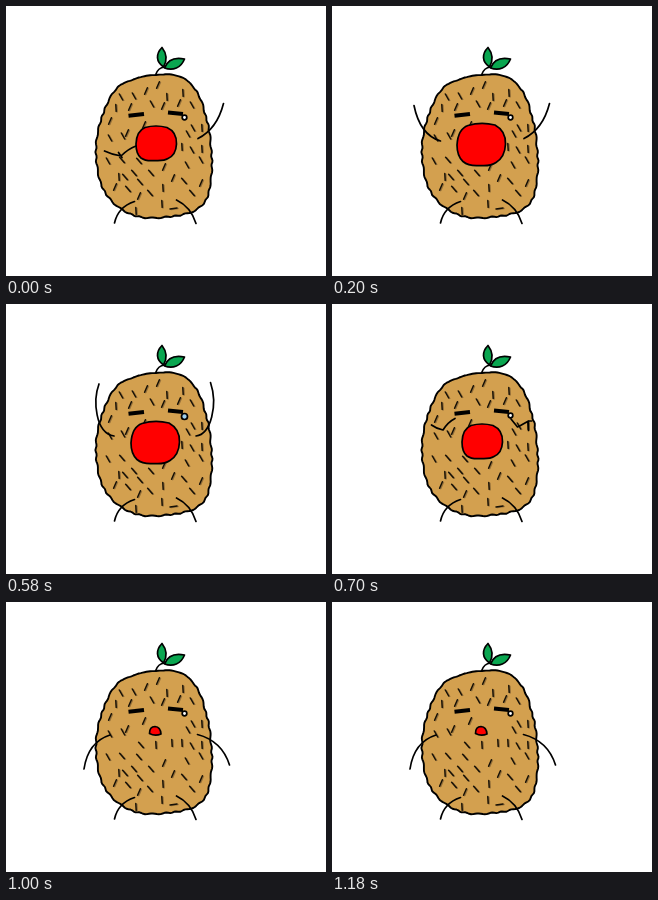
These frames come from a looping animation (320x270 px, 1300 ms). An HTML page:

```html
<!DOCTYPE html>
<html lang="en">
<head>
<meta charset="utf-8">
<title>Yawning potato</title>
<style>
html, body { margin: 0; width: 100%; height: 100%; overflow: hidden; background: #fff; }
svg { display: block; width: 100vw; height: 100vh; }
.line { fill: none; stroke: #000; stroke-width: 1.7; stroke-linecap: round; stroke-linejoin: round; }
</style>
</head>
<body>
<svg viewBox="0 0 320 270">
  <path id="body" fill="#d3a04f" stroke="#000" stroke-width="1.9" stroke-linejoin="round"/>
  <g fill="none" stroke-linecap="round">
    <path id="shade" stroke="#95703a" stroke-width="1.4" transform="translate(1.1 .5)"/>
    <path id="seeds" stroke="#161006" stroke-width="1.5"/>
  </g>
  <g class="line">
    <path d="M149.500 69Q152 61.500 158.500 61"/>
    <path fill="#0aa650" d="M157.500 61C150 56 149.500 48 156 41.500C161 48 161 55 157.500 61Z"/>
    <path fill="#0aa650" d="M158.500 62C162 53 169 51 178.500 53C175 62 167 65 158.500 62Z"/>
    <path d="M128.500 195.500Q112 201 108.500 217"/>
    <path d="M170.500 194Q185 201 190 217.500"/>
  </g>
  <path d="M122.500 109.800L138 108M162 106.500L177 108" stroke="#000" stroke-width="4" fill="none"/>
  <path id="mouth" class="line" style="fill:#f00"/>
  <circle id="tear" class="line" cx="178.500"/>
  <path id="arms" class="line"/>
</svg>
<script>
const $ = id => document.getElementById(id);

// Smooth closed curve through a few points.
function closedCurve(points) {
  const n = points.length, at = i => points[(i + n) % n];
  let d = `M${points[0]}`;
  for (let i = 0; i < n; i++) {
    const [a, b, c, e] = [at(i - 1), at(i), at(i + 1), at(i + 2)];
    const p = b.map((v, k) => v + (c[k] - a[k]) / 6);
    const q = c.map((v, k) => v - (e[k] - b[k]) / 6);
    d += `C${p} ${q} ${c}`;
  }
  return d + 'Z';
}

const outline = closedCurve([
  [150, 69], [165, 68.5], [179, 73], [188, 82], [195, 94], [199, 108], [203, 123],
  [205, 142], [206, 160], [204, 180], [200, 194], [190, 204], [175, 209], [160, 211],
  [145, 212], [130, 210], [115, 203], [103, 192], [95, 178], [91, 160], [90, 142],
  [92, 125], [97, 108], [104, 92], [113, 80], [126, 74], [139, 70]
]);

// Roughen the lower part of the skin.
function roughen(path, d) {
  path.setAttribute('d', d);
  const length = path.getTotalLength(), steps = 220;
  let rough = '';
  for (let i = 0; i < steps; i++) {
    const { x, y } = path.getPointAtLength(length * i / steps);
    const dx = x - 148, dy = y - 141;
    const amount = y > 82 ? 0.55 : 0.1;
    const k = 1 + amount * Math.sin(i * 1.05 + Math.sin(i * 0.31)) / Math.hypot(dx, dy);
    rough += `${i ? 'L' : 'M'}${(148 + dx * k).toFixed(1)} ${(141 + dy * k).toFixed(1)}`;
  }
  path.setAttribute('d', rough + 'Z');
}
roughen($('body'), outline);

// Seed centres grouped by the lean of the stroke.
const seedGroups = [
  [1.7, 3, '115,91 128,90 146,98 186,99 117,130 104,132 102,155 187,122 182,128 186,144 181,159 195,154'],
  [2.4, 2.7, '116,154 133,155 128,167 134,176 144,187 119,171 145,167 178,175 186,187 135,143 122,183'],
  [-1.4, 3.2, '140,85 152,79 124,101 157,100 173,97 104,115 121,127 138,119 109,181 133,190 167,172 195,177 158,161'],
  [0.2, 3.4, '161,91 177,87 110,102 196,122 176,141 196,143 157,182 113,171 156,198 130,205 166,141 150,143']
];
const seeds = seedGroups.map(([dx, dy, spots]) =>
  spots.split(' ').map(spot => {
    const [x, y] = spot.split(',').map(Number);
    return `M${x - dx} ${y - dy}l${2 * dx} ${2 * dy}`;
  }).join('')).join('') + 'M164 203l7 -1';
$('seeds').setAttribute('d', seeds);
$('shade').setAttribute('d', seeds);

const mouths = {
  mid: 'M139 121.500Q150 118.500 161 121.500Q171 126 170.500 138Q170 149 162 152.500Q158 155 149 154.500Q140 155.500 135 152Q130 148 130 138Q130.500 125 139 121.500Z',
  wide: 'M136 119.500Q149 115.500 163 119Q174 125 173.500 138Q173 151 164 156.500Q158 160.500 148 159.500Q137 160.500 131 155.500Q125 150 125 139Q126 123 136 119.500Z',
  small: 'M143.500 131.500Q143.500 124.500 149 124.500Q154.500 125 155 132Q149 134.500 143.500 131.500Z'
};
const raisedRight = 'M192 132.500Q211 123 217.500 97.500';
const poses = [
  { until: 200, mouth: 'mid', arms: 'M98.500 145Q107 149 115 150Q122 143 130 140M112.500 146.500L116 151.500' + raisedRight },
  { until: 400, mouth: 'wide', arms: 'M82 99.500Q88 129 108.500 135' + raisedRight },
  { until: 700, mouth: 'wide', wet: true, arms: 'M93 80C87 96 89 129 108 132M204.500 78.500C212 101 205 130 190 132' },
  { until: 1000, mouth: 'mid', arms: 'M99.500 121Q105 125 111 126Q116 118 123 114.500M179 115L185.500 123L188.500 121.500L196.500 117V126.500M196.500 117H199.500' },
  { until: 1300, mouth: 'small', arms: 'M104 133Q82 140 78 167M191.500 132.500Q216 139 223.500 163' }
];

function draw(time) {
  const pose = poses.find(p => time % 1300 < p.until);
  $('mouth').setAttribute('d', mouths[pose.mouth]);
  $('arms').setAttribute('d', pose.arms);
  $('tear').setAttribute('cy', pose.wet ? 112.500 : 111.500);
  $('tear').setAttribute('r', pose.wet ? 3 : 2.3);
  $('tear').style.fill = pose.wet ? '#9fd0ee' : '#fff';
}

const start = performance.now();
function tick() {
  draw(performance.now() - start);
  requestAnimationFrame(tick);
}
tick();
</script>
</body>
</html>
```
